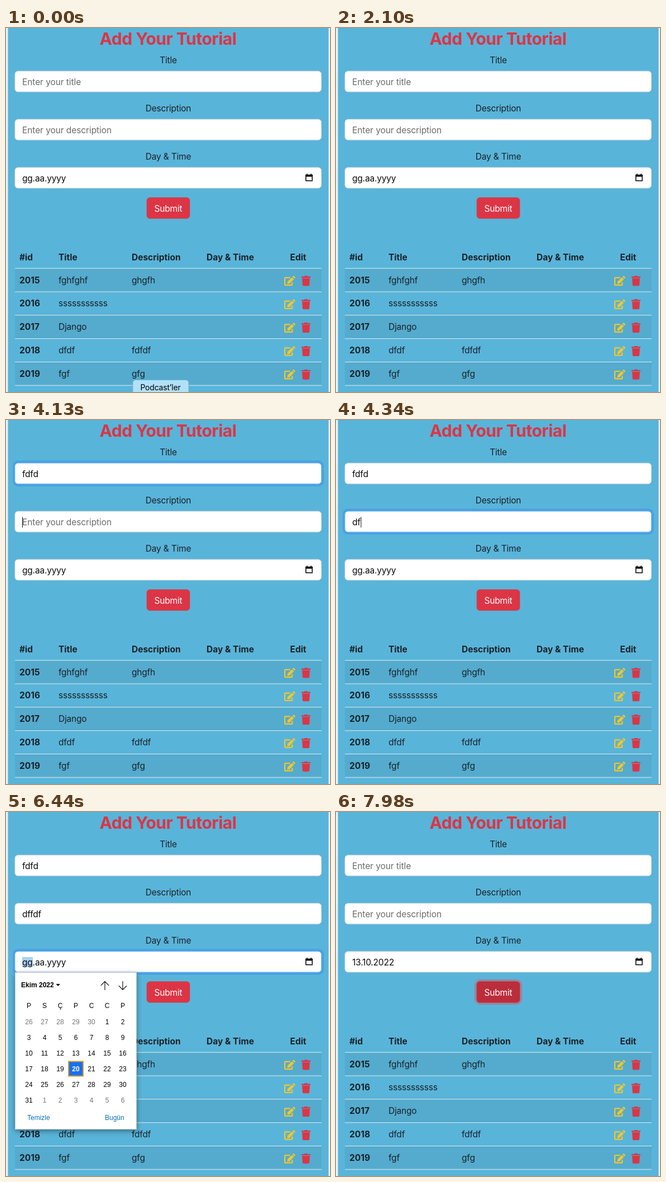
An HTML page that plays this animation: 580 by 650 pixels, repeating every 8 s.

```html
<!DOCTYPE html>
<html lang="en">
<head>
<meta charset="utf-8">
<title>Add Your Tutorial</title>
<style>
  html, body { margin: 0; width: 100%; height: 100%; overflow: hidden; background: #59b4d9; }
  svg { display: block; width: 580px; height: 650px; }
  text { font: 15.5px Inter, "Open Sans", sans-serif; letter-spacing: -.2px; fill: #1b2127; white-space: pre; }
  .bold { font-weight: 700; letter-spacing: 0; }
  .mid { text-anchor: middle; }
  .heading { font-size: 30px; font-weight: 700; letter-spacing: -.5px; fill: #dc3545; }
  .hint { fill: #6a6a6c; letter-spacing: -.08px; }
  .value { fill: #0a0a0a; }
  .button { fill: #fff; }
  .label { font-size: 14px; fill: #000; }
  #picker text { font: 12px "Liberation Sans", Arial, sans-serif; letter-spacing: 0; fill: #000; }
  #picker .strong { font-weight: 700; }
  #picker .other { fill: #757575; }
  #picker .today { font-weight: 700; fill: #fff; }
  #picker .link { fill: #0b6fb8; }
</style>
</head>
<body>
<svg viewBox="0 0 580 650">
  <defs>
    <filter id="shadow" x="-10%" y="-10%" width="120%" height="120%">
      <feDropShadow dx="0" dy="3" stdDeviation="5" flood-color="#000" flood-opacity=".4"/>
    </filter>
    <g id="edit" fill="#f3c62b">
      <path d="M10.5 3.3H2a.9.9 0 0 0-.9.9v11.6a.9.9 0 0 0 .9.9h11.5a.9.9 0 0 0 .9-.9v-4.3" fill="none" stroke="#f3c62b" stroke-width="2.2"/>
      <path d="M13.7 2.7 17.3 6.3 9.5 14.1 5.5 14.5 5.9 10.5ZM14.7 1.7 16.2.4Q17 0 17.8.6L19.4 2.2Q20 3 19.6 3.8L18.3 5.3Z"/>
    </g>
    <path id="trash" fill="#dc3545" d="M0 1.2H4.8L5.4 0H10.6L11.2 1.2H16V3.4H0ZM1.1 4.2H14.9L14.1 16.4Q14 18 12.5 18H3.5Q2 18 1.9 16.4Z"/>
  </defs>
  <path fill="#59b4d9" d="M0 0H580V650H0Z"/>
  <path fill="#e8f2f7" d="M0 0H3.5V650H0ZM577.5 0H580V650H577.5Z"/>
  <g id="page"></g>
  <g id="picker"></g>
  <g id="dock">
    <rect x="227" y="628.5" width="100" height="30" rx="5" fill="#b0e1f8" stroke="#74b3ce"/>
    <text class="label mid" x="276.5" y="646.5">Podcast’ler</text>
  </g>
</svg>
<script>
const LOOP = 8000, STEP = 70;
const $ = id => document.getElementById(id);

function add(parent, tag, attrs, content = '') {
  const el = document.createElementNS('http://www.w3.org/2000/svg', tag);
  for (const key in attrs) el.setAttribute(key, attrs[key]);
  el.textContent = content;
  parent.append(el);
  return el;
}
const page = $('page'), picker = $('picker');
const write = (parent, x, y, content, cls = '') => add(parent, 'text', { x, y, class: cls }, content);
const box = (parent, x, y, width, height, attrs) => add(parent, 'rect', { x, y, width, height, ...attrs });

// Form
write(page, 290, 30, 'Add Your Tutorial', 'heading mid');

function makeField(label, y) {
  write(page, 290.5, y - 14, label, 'mid');
  const ring = box(page, 12, y - 4, 557, 46, { rx: 9.5, fill: '#0d6efd' });
  const border = box(page, 16, y + .5, 548.5, 37, { rx: 5.5, fill: '#fff', stroke: '#ced4da' });
  const select = box(page, 29, y + 10.5, 19, 18, { fill: '#a9d2f6' });
  const text = write(page, 29, y + 25, '');
  const caret = box(page, 29, y + 10.5, 1, 19, { fill: '#111' });
  return { ring, border, select, text, caret };
}
const fields = [makeField('Title', 76.5), makeField('Description', 162.5), makeField('Day & Time', 248.5)];
const [title, description, date] = fields;

add(page, 'path', { d: 'M536.8 263.4H548.2V272.8H536.8Z', fill: 'none', stroke: '#000', 'stroke-width': 1.5 });
add(page, 'path', { d: 'M536 261.7H549V265.4H536ZM538 260.2H539.6V262.4H538ZM545.4 260.2H547V262.4H545.4Z' });

const buttonRing = box(page, 248, 299, 85, 45, { rx: 10, fill: '#e15361' });
const button = box(page, 251.7, 302.6, 77.6, 38, { rx: 6 });
write(page, 290.5, 327.5, 'Submit', 'button mid');

// Table
const columns = [24, 94, 225, 359];
['#id', 'Title', 'Description', 'Day & Time'].forEach((name, i) => write(page, columns[i], 414.5, name, 'bold'));
write(page, 523, 414.5, 'Edit', 'bold mid');
const rows = [['fghfghf', 'ghgfh'], ['sssssssssss', ''], ['Django', ''], ['dfdf', 'fdfdf'], ['fgf', 'gfg']];
rows.forEach((cells, i) => {
  const top = 429.5 + 41.8 * i;
  if (i % 2 === 0) box(page, 16, top, 549, 41.8, { fill: '#000', opacity: .05 });
  [2015 + i, ...cells].forEach((cell, c) => write(page, columns[c], top + 26, cell, c ? '' : 'bold'));
  add(page, 'use', { href: '#edit', x: 498, y: top + 13 });
  add(page, 'use', { href: '#trash', x: 529, y: top + 13 });
});
for (let i = 0; i <= rows.length; i++)
  box(page, 16, 428.7 + 41.8 * i, 549, 1.1, { fill: '#d6e6ed' });

// Date picker
box(picker, 16, 286, 218, 281, { fill: '#fff', filter: 'url(#shadow)' });
box(picker, 16.5, 286.5, 217, 280, { fill: '#fff', stroke: '#c4cdd2' });
write(picker, 27, 313, 'Ekim 2022', 'strong');
add(picker, 'path', { d: 'M89.5 307H97L93.2 311Z' });
add(picker, 'path', {
  d: 'M177 318V302.5M169.8 309.8 177 302.5 184.2 309.8M209 302V317.5M201.8 310.2 209 317.5 216.2 310.2',
  fill: 'none', stroke: '#000', 'stroke-width': 1.1
});
[...'PSÇPCCP'].forEach((day, i) => write(picker, 41 + 28 * i, 350, day, 'mid'));
box(picker, 112, 445.5, 26, 26, { fill: '#1a6ff3', stroke: '#d29d30', 'stroke-width': 2 });
for (let i = 0; i < 42; i++) {
  const day = i < 5 ? 26 + i : (i - 5) % 31 + 1;
  const kind = i < 5 || i > 35 ? 'other' : day === 20 ? 'today' : '';
  write(picker, 41 + 28 * (i % 7), 379 + 28 * Math.floor(i / 7), day, 'mid ' + kind);
}
write(picker, 38, 550, 'Temizle', 'link');
write(picker, 177, 550, 'Bugün', 'link');

// Timeline
const PICK = 6930, PRESS = 7770, RESET = 7910;
const within = (t, from, to) => t >= from && t < to;
const show = (el, on) => el.setAttribute('visibility', on ? 'visible' : 'hidden');

function ease(t, start, length = 150) {
  const p = Math.min(1, Math.max(0, (t - start) / length));
  return p * p * (3 - 2 * p);
}
const blend = (a, b, p) => `rgb(${a.map((v, i) => Math.round(v + (b[i] - v) * p))})`;
const typed = (t, word, times) => t >= RESET ? '' : word.slice(0, times.filter(at => t >= at).length);

function setText(field, value, hint) {
  field.text.textContent = value || hint;
  field.text.setAttribute('class', value ? 'value' : 'hint');
}
function setFocus(field, t, from, to) {
  const p = ease(t, from) - ease(t, to);
  field.ring.setAttribute('opacity', .25 * p);
  field.border.setAttribute('stroke', blend([206, 212, 218], [134, 183, 254], p));
}
function setCaret(field, value, on) {
  show(field.caret, on);
  field.caret.setAttribute('x', value ? 29.5 + field.text.getComputedTextLength() : 29);
}

function draw(t) {
  $('dock').setAttribute('opacity', 1 - ease(t, 0, 350));

  const titleText = typed(t, 'fdfd', [3220, 3290, 3500, 3640]);
  const descriptionText = typed(t, 'dffdf', [4270, 4340, 4410, 4550, 4690]);
  setText(title, titleText, 'Enter your title');
  setText(description, descriptionText, 'Enter your description');
  setText(date, t < PICK ? 'gg.aa.yyyy' : '13.10.2022', '');

  setFocus(title, t, 3010, 4130);
  setFocus(description, t, 4130, 5460);
  setFocus(date, t, 5460, PRESS);
  setCaret(title, titleText, within(t, 3010, 4130));
  setCaret(description, descriptionText, within(t, 4130, 5460));
  show(date.caret, false);
  fields.forEach(field => show(field.select, field === date && within(t, 5460, PRESS)));
  show(picker, within(t, 5600, PICK));

  const press = ease(t, PRESS);
  button.setAttribute('fill', blend([220, 53, 69], [187, 45, 59], press));
  buttonRing.setAttribute('opacity', .5 * press);
}

function frame(now) {
  const t = now % LOOP;
  draw(t - t % STEP);
  requestAnimationFrame(frame);
}
requestAnimationFrame(frame);
</script>
</body>
</html>
```
